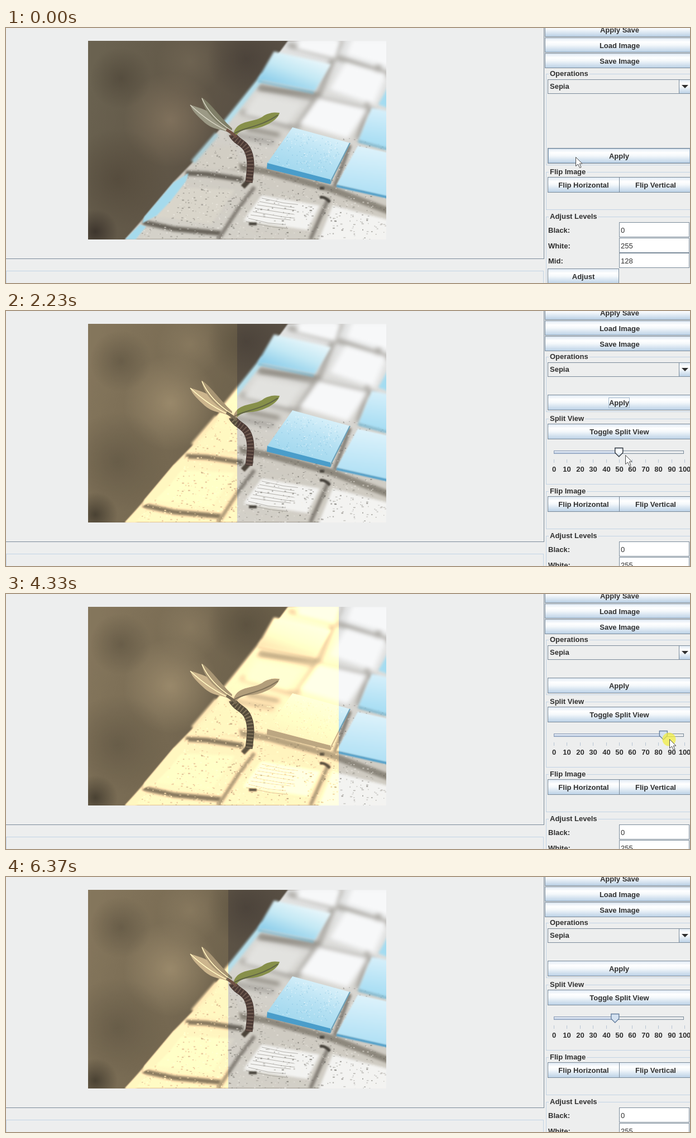
An HTML page with a canvas for the animation above (6.83 s loop, 1225 by 457 pixels).

```html
<!DOCTYPE html>
<html>
<head>
<meta charset="utf-8">
<style>
  html, body { margin: 0; width: 100%; height: 100%; overflow: hidden; background: #edeeee; }
  canvas { display: block; }
</style>
</head>
<body>
<canvas id="stage" width="1225" height="457"></canvas>
<script>
const LOOP = 6830, STEP = 70;
const PHOTO = { x: 147, y: 23, w: 534, h: 356 };
const BG = '#edeeee', EDGE = '#7a8a99', PALE = '#c2d3e4', INK = '#2f2f2f';
const ctx = document.getElementById('stage').getContext('2d');

// [time, value]
const splitKeys = [[2990, 50], [3350, 55], [3630, 62], [4330, 84.1], [4400, 87], [4470, 88],
  [4540, 87], [4680, 72.7], [4820, 66.2], [5170, 41.1], [5240, 40], [5530, 47]];
// [time, x, y]
const cursorKeys = [[0, 1020, 231], [60, 1019, 226], [950, 1019, 226], [1290, 1055, 219], [1490, 1056, 220],
  [1780, 1056, 220], [2230, 1109, 258], [2430, 1101, 254], [2990, 1102, 254], [3350, 1112, 255],
  [3630, 1130, 257], [4330, 1188, 260], [4470, 1189, 260], [4540, 1184, 259], [4680, 1153, 256],
  [4820, 1137, 254], [5170, 1077, 249], [5240, 1076, 250], [5530, 1093, 252], [5800, 1093, 252],
  [5890, 1057, 375], [5960, 1030, 470], [6150, 1030, 470], [6220, 1021, 446], [6290, 1000, 449], [6360, 990, 470]];

function sample(keys, t, i = 1) {
  const n = keys.findIndex(k => k[0] > t);
  if (n === 0) return keys[0][i];
  if (n < 0) return keys[keys.length - 1][i];
  const a = keys[n - 1], b = keys[n];
  return a[i] + (b[i] - a[i]) * (t - a[0]) / (b[0] - a[0]);
}

function newLayer() {
  const c = document.createElement('canvas');
  c.width = PHOTO.w;
  c.height = PHOTO.h;
  return c;
}

function paintPhoto() {
  const layer = newLayer(), g = layer.getContext('2d');
  let seed = 7;
  const rnd = () => (seed = seed * 16807 % 2147483647) / 2147483647;
  const soft = px => g.filter = px ? `blur(${px}px)` : 'none';
  const fill = (d, color) => { g.fillStyle = color; g.fill(new Path2D(d)); };
  const line = (d, color, width) => {
    g.strokeStyle = color;
    g.lineWidth = width;
    g.stroke(new Path2D(d));
  };
  const shade = (x0, y0, x1, y1, ...colors) => {
    const grad = g.createLinearGradient(x0, y0, x1, y1);
    colors.forEach((c, i) => grad.addColorStop(i / (colors.length - 1), c));
    return grad;
  };
  const glow = (x, y, r, rgb, a) => {
    const grad = g.createRadialGradient(x, y, 0, x, y, r);
    grad.addColorStop(0, `rgba(${rgb},${a})`);
    grad.addColorStop(1, `rgba(${rgb},0)`);
    g.fillStyle = grad;
    g.fillRect(x - r, y - r, 2 * r, 2 * r);
  };
  g.translate(-PHOTO.x, -PHOTO.y);

  g.fillStyle = shade(147, 100, 440, 200, '#6a6250', '#625848', '#574e43');
  g.fillRect(PHOTO.x, PHOTO.y, PHOTO.w, PHOTO.h);
  glow(295, 165, 85, '146,128,104', .6);
  glow(330, 60, 60, '128,116,96', .4);
  glow(205, 90, 55, '68,60,48', .5);
  glow(430, 55, 70, '66,58,52', .6);
  glow(200, 270, 90, '80,70,56', .7);
  glow(160, 365, 40, '52,44,38', .8);

  const ledge = 'M505 23L455 90L400 160L335 240L300 276L243 345L213 379H690V15Z';
  soft(1);
  fill(ledge, shade(500, 23, 400, 379, '#e4e5e5', '#d9d8d4', '#cfcbc2', '#d4d1c9'));
  soft(0);
  g.save();
  g.clip(new Path2D(ledge));

  // Defocused rows and grout
  soft(4);
  line('M505 30L600 55L690 85M450 104L560 128L660 150M420 150L520 180M600 20L560 120L520 180M670 60L630 200M400 190L480 205', '#a7a49e', 9);
  line('M452 108L560 120M430 180L490 192', '#7f7a70', 6);
  fill('M560 125L648 145L612 198L525 172ZM608 62L681 82L660 138L580 110ZM525 20H600L590 55L520 38ZM620 20H690V72L610 48Z', '#f7f8f9');
  fill('M450 120L530 135L505 172L425 155Z', '#e2e2df');
  soft(2);
  line('M385 243L470 258L580 288L690 330', '#8d887d', 12);
  line('M322 260L360 262L425 272M245 348L300 360L385 368', '#68635a', 9);
  line('M445 285L415 325L380 379M578 305L545 379M616 210L588 285', '#858078', 7);
  fill('M300 285L410 290L368 352L262 337Z', '#d9d5ca');
  fill('M458 300L562 318L540 362L425 345Z M585 318L690 345V390H556Z', '#f3f3f1');
  fill('M350 215L410 212L420 255L340 250Z', '#d2cec4');
  soft(0);

  // Stone grain
  for (let i = 0; i < 1500; i++) {
    const x = 220 + rnd() * 461, y = 195 + rnd() * 184, v = rnd() < .6 ? 85 + rnd() * 50 | 0 : 245;
    g.fillStyle = `rgba(${v},${v - 3},${v - 10},${.2 + rnd() * .35})`;
    g.fillRect(x, y, 1 + rnd() * 3, 1 + rnd() * 1.6);
  }
  for (let i = 0; i < 8; i++) {
    const y = 305 + i * 6;
    line(`M${458 - i * 4} ${y}l${35 + rnd() * 20} ${6 + rnd() * 4}l${20 + rnd() * 18} 3`, 'rgba(115,110,102,.5)', 1);
  }
  soft(1);
  line('M562 304q8 -3 18 8M435 351h14M562 287h8', '#48443d', 5);
  soft(0);
  g.restore();

  // Blue tiles
  soft(2);
  line('M462 84L407 153L385 180', '#b4deeb', 9);
  line('M378 190L335 240', '#a9cdd6', 8);
  fill('M480 42L582 65L553 113L451 92Z', shade(530, 45, 505, 112, '#eaf7fb', '#c3e8f4', '#8accea'));
  line('M451 95L551 116', '#72b7d3', 3);
  fill('M655 143L690 150V218L631 201Z', shade(660, 145, 650, 212, '#d5effa', '#a4dcf3'));
  line('M631 203L690 219', '#56a9cc', 3);
  fill('M684 106L667 137L690 146Z', '#a4dcf1');
  soft(1);
  fill('M300 277L327 260L322 275L295 310L270 336L244 350L248 338Z', '#a5daec');
  fill('M240 352L251 356L232 379H213Z', '#a5daec');
  fill('M630 211L690 225V304L592 281Z', shade(640, 214, 630, 292, '#dcf2fb', '#b2e1f5'));
  line('M592 283L690 305', '#4f9fca', 4);
  soft(.6);
  fill('M468 241L581 270L581 280L467 252Z', '#4a9dca');
  fill('M513 178L616 206L583 272L468 242Z', shade(550, 182, 522, 262, '#d9f1fa', '#b6e1f3', '#a2d8ee'));
  line('M616 206L583 272L581 279', '#6a9fb7', 2);
  soft(0);
  for (let i = 0; i < 160; i++) {
    const u = rnd(), v = rnd();
    g.fillStyle = rnd() < .5 ? 'rgba(255,255,255,.5)' : 'rgba(95,170,205,.35)';
    g.fillRect(510 + u * 98 - v * 38, 182 + u * 26 + v * 58, 1.5, 1.5);
  }

  // Seedling
  const stem = 'M405 190C412 205 428 205 434 222C441 240 437 258 435 277';
  soft(1);
  line('M424 285L440 268', '#4c443a', 9);
  soft(.5);
  line(stem, '#4b3a35', 13);
  g.setLineDash([2, 4]);
  line(stem, '#715c51', 11);
  g.setLineDash([]);
  fill('M406 191C385 178 372 186 352 166C339 154 333 147 330 138C348 143 372 151 386 166Z', '#9b9985');
  fill('M404 187C380 172 355 154 350 124C367 135 380 156 405 180Z', '#807f68');
  line('M330 138C347 154 371 174 405 188M351 126C361 149 380 169 405 185', '#dad7c6', 1.5);
  fill('M408 187C416 163 445 171 462 157C473 151 482 151 490 152C487 166 460 180 438 181C425 182 418 184 410 195Z', '#87904a');
  line('M409 189C426 178 455 178 487 156', '#606446', 2);
  line('M395 182Q408 190 413 196', '#705245', 5);
  return layer;
}

function toSepia(source) {
  const layer = newLayer(), g = layer.getContext('2d');
  const img = source.getContext('2d').getImageData(0, 0, PHOTO.w, PHOTO.h), d = img.data;
  for (let i = 0; i < d.length; i += 4) {
    const [r, gr, b] = d.slice(i, i + 3);
    d[i] = .393 * r + .769 * gr + .189 * b;
    d[i + 1] = .349 * r + .686 * gr + .168 * b;
    d[i + 2] = .272 * r + .534 * gr + .131 * b;
  }
  g.putImageData(img, 0, 0);
  return layer;
}

const photo = paintPhoto(), sepia = toSepia(photo);

function text(s, x, y, align = 'left', weight = 'bold') {
  ctx.font = `${weight} 13px "Liberation Sans", Arial, sans-serif`;
  ctx.textAlign = align;
  ctx.fillStyle = INK;
  ctx.fillText(s, x, y);
}

function rect(x, y, w, h, stroke, fill) {
  if (fill) {
    ctx.fillStyle = fill;
    ctx.fillRect(x, y, w, h);
  }
  ctx.strokeStyle = stroke;
  ctx.lineWidth = 1;
  ctx.strokeRect(x + .5, y + .5, w - 1, h - 1);
}

function sheen(y, h) {
  const grad = ctx.createLinearGradient(0, y, 0, y + h);
  [[0, '#dde8f3'], [.3, '#ffffff'], [.5, '#f4f8fb'], [1, '#b8cfe5']].forEach(s => grad.addColorStop(...s));
  return grad;
}

function button(label, x, y, w, { h = 28, hover, pressed, focus } = {}) {
  rect(x, y, w, h, EDGE, pressed ? '#b8cfe5' : sheen(y, h));
  if (hover) rect(x + 1, y + 1, w - 2, h - 2, '#9fb6cd');
  const cx = x + w / 2;
  if (focus) rect(Math.round(cx) - 19, y + 5, 38, 19, '#a3b8cc');
  text(label, cx, y + h / 2 + 5, 'center');
}

function group(title, y, h) {
  rect(967, y, 270, h, PALE);
  ctx.font = 'bold 13px "Liberation Sans", Arial, sans-serif';
  ctx.fillStyle = BG;
  ctx.fillRect(972, y - 4, ctx.measureText(title).width + 4, 9);
  text(title, 974, y + 4);
}

function field(label, value, y) {
  text(label, 971, y + 19);
  rect(1098, y, 126, 27, EDGE, '#fff');
  text(value, 1101, y + 19, 'left', 'normal');
}

function slider(value, focused, t) {
  const x = 981 + 2.335 * value;
  rect(981, 250, 233, 6, EDGE, '#e9ebed');
  const grad = ctx.createLinearGradient(0, 250, 0, 256);
  grad.addColorStop(0, '#ffffff');
  grad.addColorStop(1, '#a3b8d8');
  rect(981, 250, x - 981, 6, '#8497b3', grad);
  // Marks the thumb leaves behind when dragged back
  if (t < 5820) {
    ctx.fillStyle = '#7f9cb5';
    for (let s = 4540; s < Math.min(t, 5110); s += STEP) {
      ctx.fillRect(Math.round(988 + 2.335 * sample(splitKeys, s)), 247, 1, 8);
    }
  }
  for (let i = 0; i <= 10; i++) {
    const tick = Math.round(981 + 23.4 * i);
    ctx.fillStyle = '#b6c4d3';
    ctx.fillRect(tick, 266, 1, 6);
    text(String(i * 10), tick + .5, 288, 'center');
  }
  ctx.beginPath();
  [[-7, 245.5], [7, 245.5], [7, 254], [0, 261], [-7, 254]].forEach(([dx, y]) => ctx.lineTo(x + dx, y));
  ctx.closePath();
  ctx.fillStyle = focused ? '#d3e1f0' : sheen(245, 17);
  ctx.fill();
  ctx.strokeStyle = focused ? '#667f9f' : '#30363d';
  ctx.lineWidth = 1.4;
  ctx.stroke();
}

function pointer(x, y, clicking) {
  if (clicking) {
    ctx.fillStyle = 'rgba(242,238,60,.72)';
    ctx.beginPath();
    ctx.arc(x - .5, y + .5, 12, 0, 7);
    ctx.fill();
  }
  ctx.save();
  ctx.translate(x + .5, y + .5);
  const arrow = new Path2D('M0 0V16L4 12.5L7 19L9.5 18L6.8 11.5H11.5Z');
  ctx.fillStyle = '#fff';
  ctx.strokeStyle = '#4a4a4a';
  ctx.lineWidth = 1;
  ctx.fill(arrow);
  ctx.stroke(arrow);
  ctx.restore();
}

function draw(t) {
  const step = Math.floor((t + 10) / STEP) * STEP - 10;
  const split = t >= 570, dy = split ? 65 : 0;
  const value = sample(splitKeys, step);
  const dragged = t >= 2990;

  ctx.fillStyle = BG;
  ctx.fillRect(0, 0, 1225, 457);
  rect(-2, -2, 966, 416, EDGE);
  rect(0, 435, 963, 40, PALE);
  ctx.drawImage(photo, PHOTO.x, PHOTO.y);
  if (split) {
    const w = Math.round(PHOTO.w * value / 100);
    ctx.drawImage(sepia, 0, 0, w, PHOTO.h, PHOTO.x, PHOTO.y, w, PHOTO.h);
  }

  button('Apply Save', 965, -11, 268, { h: 27 });
  button('Load Image', 965, 17, 268, { h: 27 });
  button('Save Image', 965, 45, 268, { h: 27 });

  group('Operations', 82, 164 - dy);
  rect(970, 92, 256, 26, EDGE);
  rect(1205, 92, 21, 26, EDGE, sheen(92, 26));
  ctx.fillStyle = INK;
  ctx.fill(new Path2D('M1210 102H1222L1216 108Z'));
  text('Sepia', 974, 109);
  button('Apply', 970, 215 - dy, 256, {
    hover: t < 960,
    pressed: t >= 220 && t < 290,
    focus: t >= 290 && !dragged
  });

  if (split) {
    group('Split View', 193, 118);
    button('Toggle Split View', 970, 202, 257, { hover: t >= 960 && t < 1860 });
    slider(value, dragged, step);
  }

  group('Flip Image', 258 + dy, 68);
  button('Flip Horizontal', 970, 267 + dy, 129);
  button('Flip Vertical', 1098, 267 + dy, 131);

  group('Adjust Levels', 338 + dy, 200);
  field('Black:', '0', 348 + dy);
  field('White:', '255', 376 + dy);
  field('Mid:', '128', 403 + dy);
  button('Adjust', 970, 431 + dy, 128);

  pointer(Math.round(sample(cursorKeys, step, 1)), Math.round(sample(cursorKeys, step, 2)),
    (t >= 220 && t < 360) || (t >= 2990 && t < 5820));
}

const start = performance.now();
function tick() {
  draw((performance.now() - start) % LOOP);
  requestAnimationFrame(tick);
}
tick();
</script>
</body>
</html>
```
